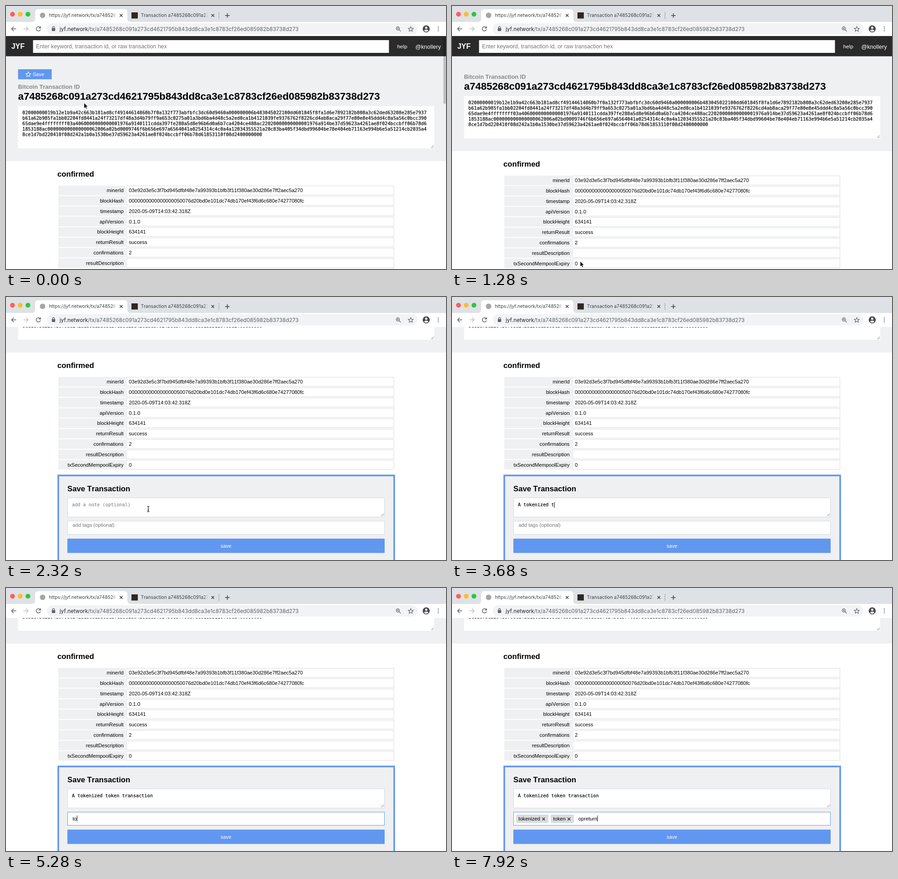
These frames come from a looping animation (968 px wide and 578 px high, 8000 ms). An HTML page:

```html
<!DOCTYPE html>
<html lang="en">
<head>
<meta charset="utf-8">
<title>Save a transaction</title>
<style>
  html, body { margin: 0; height: 100%; overflow: hidden; background: #fff; }
  svg { display: block; width: 100vw; height: 100vh; }
  text { font: 11.15px "Liberation Sans", Arial, sans-serif; font-kerning: none; white-space: pre; }
  .ui { font-family: Inter, sans-serif; font-size: 10.2px; fill: #3c4043; }
  .mono { font-family: "DejaVu Sans Mono", monospace; font-size: 10.2px; stroke: #000; stroke-width: .2; }
  .bold { font-weight: bold; }
  .h2 { font-weight: bold; font-size: 16.7px; }
  .white { fill: #fff; }
  .hint { fill: #757575; stroke: none; }
  .line { fill: none; stroke: #5f6368; stroke-width: 1.5; }
  .box { fill: #fff; stroke: #d9dadc; }
  .soft { fill: #eff0f2; }
  .blue { fill: #6197f0; }
</style>
</head>
<body>
<svg viewBox="0 0 968 578">
  <defs>
    <clipPath id="viewport"><rect y="66" width="968" height="512"/></clipPath>
    <linearGradient id="fadeWhite"><stop stop-color="#fff" stop-opacity="0"/><stop offset=".7" stop-color="#fff"/></linearGradient>
    <linearGradient id="fadeGrey"><stop stop-color="#dee1e6" stop-opacity="0"/><stop offset=".7" stop-color="#dee1e6"/></linearGradient>
    <path id="star" d="M0-5.5L1.6-1.9 5.5-1.6 2.5 1 3.4 4.8 0 2.8-3.4 4.8-2.5 1-5.5-1.6-1.6-1.9Z"/>
    <path id="cross" d="M-3-3L3 3M3-3L-3 3"/>
    <path id="grip" d="M-6 0L0-6M-3 0L0-3" fill="none" stroke="#777" stroke-width=".9"/>
  </defs>

  <g clip-path="url(#viewport)">
    <g id="page">
      <g id="content">
        <rect class="soft" y="111" width="968" height="230"/>
        <g id="saveButton">
          <rect class="blue" x="26.5" y="139" width="74" height="22"/>
          <use href="#star" x="49" y="150.3" fill="none" stroke="#fff" stroke-width="1.1"/>
          <text class="white" x="58.7" y="154.2">Save</text>
        </g>
        <text class="bold" x="26.6" y="181.8" fill="#888" style="font-size:12.8px">Bitcoin Transaction ID</text>
        <text class="bold" id="txTitle" x="26.5" y="206" style="font-size:22.27px"></text>
        <rect x="26.5" y="220" width="915.5" height="93" fill="#fff"/>
        <g id="rawHex"></g>
        <use href="#grip" x="941" y="312"/>
        <text class="h2" x="113" y="374.5">confirmed</text>
        <g id="table"></g>

        <g transform="translate(0 219)">
          <rect class="soft" x="115" y="392.2" width="739" height="220" stroke="#6197f0" stroke-width="3.6"/>
          <text class="h2" x="135" y="427.4">Save Transaction</text>
          <rect class="box" id="noteBox" x="135.5" y="441.5" width="697" height="42"/>
          <use href="#grip" id="noteGrip" x="831" y="481.5"/>
          <text class="mono" id="note" x="145" y="460.3"></text>
          <g id="tagField">
            <rect class="box" id="tagBox" x="135.5" y="492.5" width="697" height="29"/>
            <g id="chips"></g>
            <text id="tagInput"></text>
          </g>
          <g id="submit">
            <rect class="blue" x="135" y="531" width="698" height="31.5" rx="1"/>
            <text class="white" x="484" y="550.5" text-anchor="middle">save</text>
          </g>
          <rect id="caret" width="1" height="13"/>
        </g>
      </g>

      <rect y="66" width="968" height="44.5" fill="#2a2a2a"/>
      <text class="white bold" x="11.7" y="94.3" style="font-size:16px">JYF</text>
      <rect x="59.5" y="75" width="783" height="28" fill="#fff"/>
      <text class="hint" x="66" y="93.4" style="font-size:12.37px">Enter keyword, transaction id, or raw transaction hex</text>
      <text class="white" x="860.5" y="93" style="font-size:11.8px">help</text>
      <text class="white" x="900.5" y="93.6" style="font-size:12.6px">@knollery</text>
    </g>
    <rect id="scrollbar" x="962.3" width="5.7" rx="2.8"/>
  </g>

  <!-- browser frame -->
  <rect width="968" height="35" fill="#dee1e6"/>
  <circle cx="14.3" cy="18" r="5.3" fill="#ff5f57"/>
  <circle cx="31.3" cy="18" r="5.3" fill="#febc2e"/>
  <circle cx="48.3" cy="18" r="5.3" fill="#28c840"/>
  <path d="M57 35Q64 35 64 28V14Q64 7 71 7H260Q267 7 267 14V28Q267 35 274 35Z" fill="#fff"/>
  <circle cx="80.5" cy="20.5" r="6" fill="#a5a5a5"/>
  <text class="ui" x="94.5" y="24.3">https://jyf.network/tx/a748526</text>
  <rect x="233" y="12" width="14" height="18" fill="url(#fadeWhite)"/>
  <rect x="276" y="14" width="14" height="13.5" fill="#2e2723"/>
  <text class="ui" x="296.7" y="24.3">Transaction a7485268c091a27</text>
  <rect x="435" y="12" width="14" height="18" fill="url(#fadeGrey)"/>
  <g class="line" style="stroke:#3c4043">
    <use href="#cross" x="253.3" y="20.7"/>
    <use href="#cross" x="455" y="20.7"/>
    <path d="M482 21H492M487 16V26"/>
  </g>
  <path d="M468.5 13V28.5" stroke="#9a9da2"/>
  <rect y="35" width="968" height="31" fill="#fff"/>
  <rect x="90" y="38" width="815.5" height="24.5" rx="12.2" fill="#f1f3f4"/>
  <g class="line">
    <path d="M22.5 50.3H12.5M17 45.5L12.2 50.3 17 55.1"/>
    <path d="M38.5 50.3H48.5M44 45.5L48.8 50.3 44 55.1" stroke="#bdc1c6"/>
    <path d="M75 47.2A4.7 4.7 0 1 0 75.8 51.5M76 44.8V48.6H72.2"/>
    <path d="M102.3 49V47.3A2.2 2.2 0 0 1 106.7 47.3V49" stroke-width="1.2"/>
    <circle cx="862" cy="49.2" r="3.6" stroke-width="1.3"/>
    <path d="M864.8 52L868.6 55.8M860.2 49.2H863.8M862 47.4V51" stroke-width="1.2"/>
    <use href="#star" x="890.5" y="50.8" stroke-width="1.2"/>
  </g>
  <rect x="100.8" y="48.5" width="7.4" height="6.5" rx="1" fill="#5f6368"/>
  <circle cx="924.5" cy="50.3" r="7.8" fill="#45494d"/>
  <circle cx="924.5" cy="47.8" r="2.5" fill="#fff"/>
  <path d="M919.5 54.3Q924.5 49.4 929.5 54.3Q924.5 58.6 919.5 54.3Z" fill="#fff"/>
  <path d="M951 46.2V55" stroke="#5f6368" stroke-width="2.3" stroke-linecap="round" stroke-dasharray="0 4.2"/>
  <text class="ui" x="118" y="54.6" style="font-size:11.76px"><tspan fill="#202124">jyf.network</tspan><tspan id="urlPath" fill="#5f6368"></tspan></text>

  <path id="arrow" d="M0 0V12L2.8 9.4 4.6 13.4 6.6 12.5 4.9 8.6H8.5Z" stroke="#fff" stroke-width=".8"/>
  <path id="ibeam" d="M-2.5-6Q0-6 0-4.5Q0-6 2.5-6M0-5V5M-2.5 6Q0 6 0 4.5Q0 6 2.5 6M-1.5 2H1.5" fill="none" stroke="#111" stroke-width="1.2"/>
</svg>

<script>
const $ = id => document.getElementById(id);

function add(parent, tag, attrs, text = '') {
  const node = document.createElementNS('http://www.w3.org/2000/svg', tag);
  for (const key in attrs) node.setAttribute(key, attrs[key]);
  node.textContent = text;
  return parent.appendChild(node);
}
const set = (id, attrs) => { for (const key in attrs) $(id).setAttribute(key, attrs[key]); };
const show = (id, visible) => set(id, { visibility: visible ? 'visible' : 'hidden' });
const move = (id, x, y) => set(id, { transform: `translate(${x} ${y})` });
const zeros = n => '0'.repeat(n);

const txId = 'a7485268c091a273cd4621795b843dd8ca3e1c8783cf26ed085982b83738d273';
$('txTitle').textContent = txId;
$('urlPath').textContent = '/tx/' + txId;

const rawLines = [
  '02000000019b12e1b9a42c663b181ad8cf49144614860b7f0a132f773abfbfc3dc60d9460a000000006b483045022100dd601845f8fa1d6e7892182b808a3c62ded63208e285e7937',
  'b61a62b985fa1bb02204fd8441a24f73217df48a3d4b79ff9a653c0275a01a3bd6ba4d48c5a2ed0ca1b4121039fe9376762f8226cd4ab8aca29f77e80e8e45ddd4c8a5a56c0bcc390',
  '65dae9e4ffffffff03a4060000000000001976a9140111cdda397fe288a5d8e96b6d0a6b7ca4204ce488ac22020000000000001976a914be37d59623a4261ae8f024bccbff06b78d6',
  `1853188ac${zeros(16)}62006a02bd0009746f6b656e697a6564041a0254314c4c0a4a12034355521a20c83ba405f34dbd99604be78e404eb71163e994b6e5a51214cb2035a4`,
  `8ce1d7bd220410f08d242a1b0a1530be37d59623a4261ae8f024bccbff06b78d61853110f08d24${zeros(8)}`
];
rawLines.forEach((line, i) =>
  add($('rawHex'), 'text', { class: 'mono', x: 36, y: 238.3 + 11.87 * i }, line));

const fields = {
  minerId: '03e92d3e5c3f7bd945dfbf48e7a99393b1bfb3f11f380ae30d286e7ff2aec5a270',
  blockHash: zeros(17) + '50076d20bd0e101dc74db170ef43f6d6c680e74277080fc',
  timestamp: '2020-05-09T14:03:42.318Z',
  apiVersion: '0.1.0',
  blockHeight: '634141',
  returnResult: 'success',
  confirmations: '2',
  resultDescription: '',
  txSecondMempoolExpiry: '0'
};
Object.entries(fields).forEach(([name, value], i) => {
  const y = 394.8 + 22.8 * i, table = $('table');
  add(table, 'rect', { class: 'soft', x: 115, y, width: 149, height: 21 });
  add(table, 'rect', { class: 'box', x: 265.5, y: y + .5, width: 588, height: 20 });
  add(table, 'text', { x: 258.7, y: y + 14.4, 'text-anchor': 'end' }, name);
  add(table, 'text', { x: 270.3, y: y + 14.4 }, value);
});

// Tab jumps to the tag field, a newline turns the word into a chip.
const keys = 'A tokenized token transaction\ttokenized\ntoken\nopreturn';
const LOOP = 8000, STEP = 80, SAVED = 340, TYPING = 2530, TAGS = 5250;
const MONO_ADVANCE = 10.2 * .602;

const pressed = t => t < TAGS
  ? Math.max(0, Math.floor((t - TYPING) / 85))
  : 32 + Math.floor((t - TAGS) / 118);

const scrollAt = t => t < 1300 ? 0 : 197 * (1 - Math.exp((1300 - t) / 61));

// time, x, y of the pointer
const pointerStops = [[0, 171.7, 213], [280, 74, 149], [440, 74, 149], [1200, 282, 561], [1760, 282, 561], [2240, 313, 466]];
function pointerAt(t) {
  const next = pointerStops.findIndex(stop => stop[0] > t);
  if (next < 0) return pointerStops.at(-1).slice(1);
  const [t0, x0, y0] = pointerStops[next - 1], [t1, x1, y1] = pointerStops[next];
  const p = (t - t0) / (t1 - t0), ease = p * p * (3 - 2 * p);
  return [x0 + (x1 - x0) * ease, y0 + (y1 - y0) * ease];
}

function drawChips(words) {
  const group = $('chips');
  group.replaceChildren();
  let x = 141;
  for (const word of words) {
    const box = add(group, 'rect', { x, y: 498, height: 18.5, rx: 2, fill: '#dcdcdd' });
    const label = add(group, 'text', { x: x + 5.3, y: 510.5 }, word);
    const width = label.getComputedTextLength() + 23.6;
    box.setAttribute('width', width);
    add(group, 'use', { href: '#cross', x: x + width - 10.8, y: 507.8, stroke: '#222', 'stroke-width': 1.3 });
    x += width + 5;
  }
  return words.length ? x + 4.7 : 146.5;
}

function drawForm(t) {
  const [note, tags] = keys.slice(0, pressed(t)).split('\t');
  const inTags = tags !== undefined;
  const words = (tags || '').split('\n'), current = words.pop();

  $('note').textContent = note || 'add a note (optional)';
  $('note').setAttribute('class', note ? 'mono' : 'mono hint');

  const inputX = drawChips(words), input = $('tagInput');
  const empty = !tags;
  input.textContent = empty ? 'add tags (optional)' : current;
  set('tagInput', { x: inputX, y: inTags ? 510.5 : 505.2, class: empty ? 'hint' : '' });
  $('tagBox').style.stroke = inTags ? '#6197f0' : '';

  const caretX = inTags
    ? inputX + (current ? input.getComputedTextLength() : 0)
    : 145 + note.length * MONO_ADVANCE;
  set('caret', { x: caretX, y: inTags ? 500 : 450.5 });
  const typing = t >= TYPING;
  show('caret', typing || t >= SAVED && (t - SAVED) % 1000 < 500);

  const slack = t < 1760 ? 1 : 0;
  set('noteBox', { height: 42 + slack });
  move('noteGrip', 0, slack);
  move('tagField', 0, slack * 1.5);
  move('submit', 0, slack * 2.5);
}

function drawScrollbar(t, scroll) {
  const fade = (from, to) => Math.min(1, Math.max(0, (to - t) / (to - from)));
  const opacity = t < 1300 ? .2 * fade(0, 160) : .5 * fade(1840, 2160);
  set('scrollbar', { y: 67 + .22 * scroll, height: t < SAVED ? 148 : 138, opacity });
}

function draw(t) {
  const scroll = scrollAt(t), [x, y] = pointerAt(t);
  move('page', 0, -scroll);
  move('content', 0, t < SAVED ? 0 : -22);
  show('saveButton', t < SAVED);
  drawForm(t);
  drawScrollbar(t, scroll);
  const overNote = t > 1760 && y < 484;
  move('arrow', x, y);
  move('ibeam', x, y);
  show('arrow', !overNote);
  show('ibeam', overNote && t < TYPING);
}

const start = performance.now();
function frame() {
  const t = (performance.now() - start) % LOOP;
  draw(Math.floor(t / STEP) * STEP);
  requestAnimationFrame(frame);
}
frame();
</script>
</body>
</html>
```
